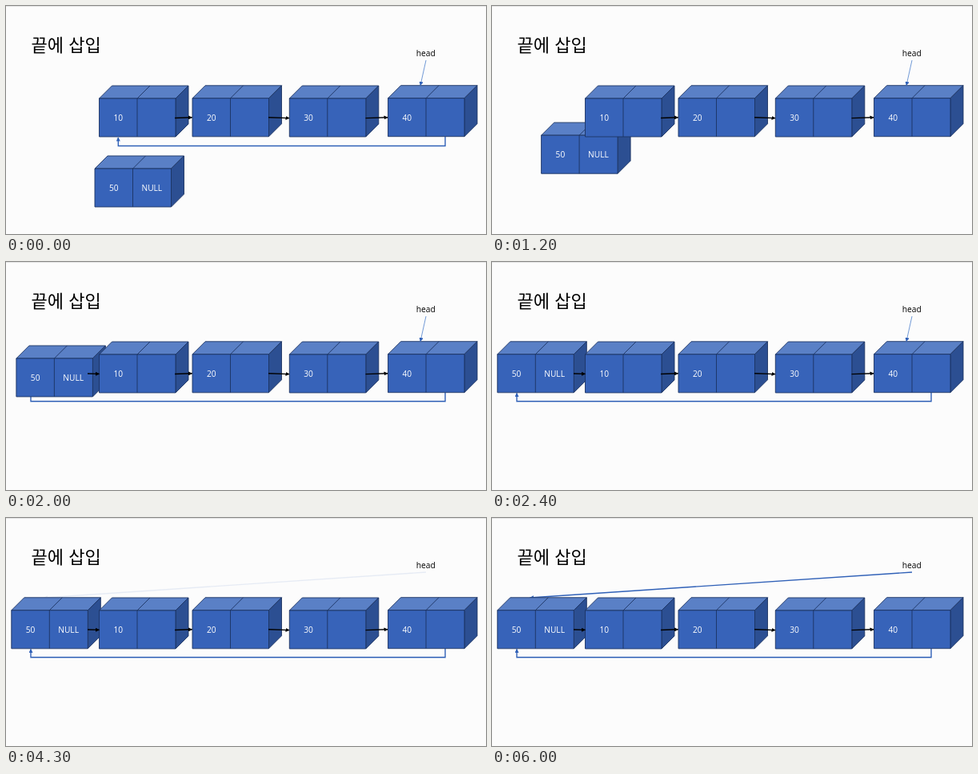
Write an HTML page that moves like this. It is 600 by 286 pixels and loops after 6.7 s.

```html
<!DOCTYPE html>
<html lang="ko">
<head>
<meta charset="utf-8">
<title>끝에 삽입</title>
<style>
  html, body { margin: 0; width: 100%; height: 100%; overflow: hidden; background: #fcfcfc; }
  svg { display: block; width: 100vw; height: 100vh; }
  text { font: 10.2px "Open Sans", "Noto Sans", sans-serif; }
  .title { font: 300 22px "Noto Sans CJK KR", "Noto Sans CJK", sans-serif; }
  .node text { fill: #fff; text-anchor: middle; }
  .node path { stroke: #1c3463; stroke-width: .9; stroke-linejoin: round; }
  .link, .wire { fill: none; }
  .link { stroke: #000; stroke-width: 1.4; }
  .wire { stroke: #2f60b7; stroke-width: 1.4; }
  .thin { stroke: #4d80cc; stroke-width: .8; }
</style>
</head>
<body>
<svg viewBox="0 0 600 286" preserveAspectRatio="none">
  <defs>
    <marker id="black" markerUnits="userSpaceOnUse" markerWidth="5" markerHeight="5" refX="4.5" refY="2.5" orient="auto">
      <path d="M0 0L5 2.5L0 5z"/>
    </marker>
    <marker id="blue" markerUnits="userSpaceOnUse" markerWidth="5" markerHeight="5" refX="4.5" refY="2.5" orient="auto">
      <path d="M0 0L5 2.5L0 5z" fill="#2f60b7"/>
    </marker>
  </defs>
  <path d="M0 .5H600" stroke="#e4e4e4"/>
  <text class="title" x="31.5" y="56.5">끝에 삽입</text>
  <text x="512.8" y="62.8">head</text>
  <g id="scene"></g>
</svg>
<script>
const LOOP = 6700, STEP = 100;
const scene = document.getElementById('scene');

function add(markup) {
  scene.insertAdjacentHTML('beforeend', markup);
  return scene.lastElementChild;
}

// x, y is the top left corner of the front face
function node(x, y, value, next = '') {
  return add(`<g class="node" transform="translate(${x} ${y})">
    <path fill="#5a80c6" d="M0 0L16-16H111.5L95.5 0z"/>
    <path fill="#2c4f92" d="M95.5 0L111.5-16V32L95.5 48z"/>
    <path fill="#3763b9" d="M0 0H95.5V48H0z"/>
    <path fill="none" d="M47.5 48V0L63.5-16"/>
    <text x="23.8" y="28.2">${value}</text>
    <text x="71.3" y="28.2">${next}</text>
  </g>`);
}

function arrow(d, kind = 'wire') {
  const head = kind === 'link' ? 'black' : 'blue';
  return add(`<path class="${kind}" d="${d}" marker-end="url(#${head})"/>`);
}

const oldReturn = arrow('M549 164V175.5H140.3V165');
const newReturn = arrow('M549 164V174.8H31V164.5');
const newHead = arrow('M525 68L47.5 100');
const inserted = node(111, 204, 50, 'NULL');
node(116.5, 116, 10);
node(233, 115.8, 20);
node(354.3, 116, 30);
node(477.5, 115.7, 40);
arrow('M211 140.5L232.5 139.8', 'link');
arrow('M328 139.8L354 140.6', 'link');
arrow('M449.5 140.6L477 139.8', 'link');
const newLink = arrow('M102 140L116.5 140.4', 'link');
const oldHead = arrow('M525 68L518 99.5', 'wire thin');

const ramp = (t, from, to) => Math.min(1, Math.max(0, (t - from) / (to - from)));

// Short acceleration, long deceleration
function glide(t) {
  if (t < 966) return .249 * ramp(t, 500, 966) ** 2;
  return 1 - .751 * (1 - ramp(t, 966, 2400)) ** 2;
}

function draw(t) {
  const p = glide(t);
  inserted.setAttribute('transform', `translate(${111 - 104.2 * p} ${204 - 88.2 * p})`);
  oldReturn.style.opacity = 1 - ramp(t, 600, 1100);
  newReturn.style.opacity = newLink.style.opacity = ramp(t, 1350, 1850);
  oldHead.style.opacity = 1 - ramp(t, 3400, 3900);
  newHead.style.opacity = ramp(t, 4250, 4750);
}

const start = performance.now();
function tick() {
  const t = (performance.now() - start) % LOOP;
  draw(Math.floor(t / STEP) * STEP);
  requestAnimationFrame(tick);
}
tick();
</script>
</body>
</html>
```
